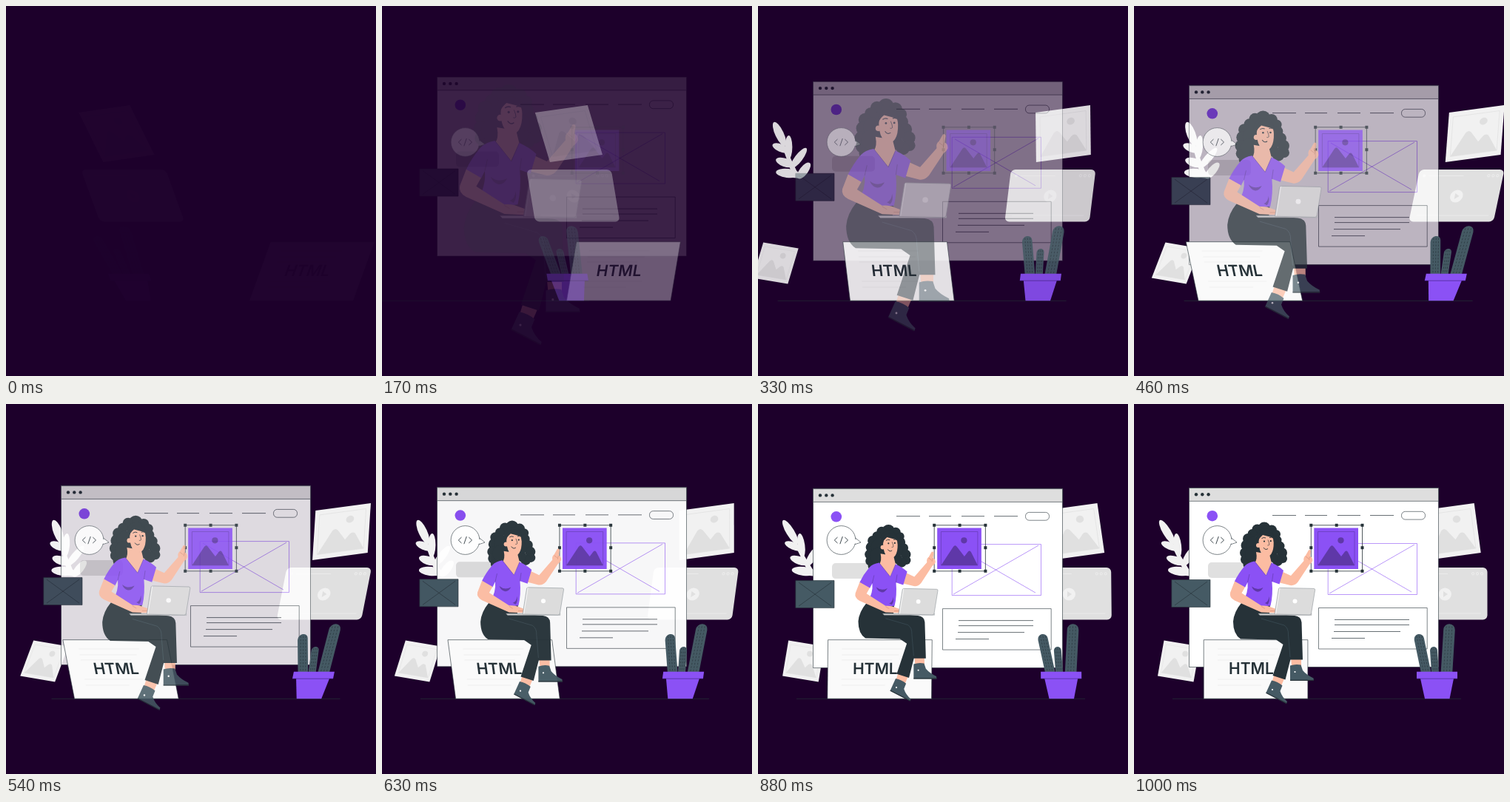
Recreate the animation shown at these times as an HTML page with a canvas. Size 500 px wide and 500 px high, loop 1040 ms.

```html
<!DOCTYPE html>
<html lang="en">
<head>
<meta charset="utf-8">
<title>Web design scene</title>
<style>
html, body { margin: 0; width: 100%; height: 100%; overflow: hidden; background: #1d002b; }
canvas { display: block; width: 500px; height: 500px; }
</style>
</head>
<body>
<canvas id="stage" width="500" height="500"></canvas>
<script>
const LOOP = 1040, FPS = 24, LEAD = 22;
const PURPLE = '#8b51f5', DARK = '#263238', SLATE = '#455a64', SKIN = '#fcbca2',
      GREY = '#e0e0e0', PALE = '#f1f1f1', WHITE = '#fff', PLUM = '#5f38a8';

const stage = document.getElementById('stage').getContext('2d');
const layer = document.createElement('canvas');
layer.width = layer.height = 500;
const c = layer.getContext('2d');

const clamp = v => Math.max(0, Math.min(1, v));

// cubic-bezier(.36, -.01, .5, 1.38)
function ease(x) {
  if (x <= 0) return 0;
  if (x >= 1) return 1;
  const at = (u, a, b) => 3 * u * (1 - u) * (1 - u) * a + 3 * u * u * (1 - u) * b + u * u * u;
  let lo = 0, hi = 1;
  for (let i = 0; i < 24; i++) {
    const mid = (lo + hi) / 2;
    if (at(mid, 0.36, 0.5) < x) lo = mid; else hi = mid;
  }
  return at(lo, -0.01, 1.38);
}

// ---- drawing helpers ----
function paint(fill, stroke, width = 0.6) {
  if (fill) { c.fillStyle = fill; c.fill(); }
  if (stroke) { c.strokeStyle = stroke; c.lineWidth = width; c.stroke(); }
}
function rect(x, y, w, h, fill, stroke, r = 0, width) {
  c.beginPath();
  c.roundRect(x, y, w, h, r);
  paint(fill, stroke, width);
}
function disc(x, y, r, fill, stroke, width) {
  c.beginPath();
  c.arc(x, y, r, 0, 7);
  paint(fill, stroke, width);
}
function line(x1, y1, x2, y2, color = DARK, width = 0.7) {
  c.beginPath();
  c.moveTo(x1, y1);
  c.lineTo(x2, y2);
  paint(null, color, width);
}
function shape(d, fill, stroke, width = 0.6) {
  const p = new Path2D(d);
  if (fill) { c.fillStyle = fill; c.fill(p); }
  if (stroke) { c.strokeStyle = stroke; c.lineWidth = width; c.stroke(p); }
}

// ---- parts, in their resting places ----
function leaf(x1, y1, x2, y2, w) {
  const mx = (x1 + x2) / 2, my = (y1 + y2) / 2;
  const len = Math.hypot(x2 - x1, y2 - y1);
  c.beginPath();
  c.ellipse(mx, my, len / 2, w / 2, Math.atan2(y2 - y1, x2 - x1), 0, 7);
  paint(PALE);
}

function plant() {
  leaf(35, 157, 54, 189, 11);
  leaf(57, 175, 61, 207, 10);
  leaf(37, 187, 60, 197, 10);
  leaf(83, 192, 66, 219, 11);
  leaf(44, 207, 69, 216, 11);
  leaf(46, 224, 78, 228, 12);
  leaf(90, 212, 77, 233, 12);
  shape('M48 180Q60 200 80 233L70 232Q58 205 46 182Z', PALE);
}

function photo(tl, tr, bl, sun) {
  c.save();
  c.transform(tr[0] - tl[0], tr[1] - tl[1], bl[0] - tl[0], bl[1] - tl[1], tl[0], tl[1]);
  rect(0, 0, 1, 1, PALE);
  rect(0.08, 0.1, 0.84, 0.8, null, GREY, 0, 0.01);
  shape('M.08 .9L.33 .46Q.38 .4 .43 .46L.57 .67L.65 .57Q.7 .52 .75 .57L.92 .9Z', GREY);
  disc(0.64, 0.27, sun, GREY);
  c.restore();
}

function photos() {
  photo([387, 144], [459.7, 134], [396, 211], 0.072);
  photo([40.5, 319.5], [89, 327.5], [32, 367.5], 0.08);
}

function video() {
  rect(363, 221, 114.5, 70.5, GREY, null, 6);
  disc(371, 229.5, 2, PALE);
  line(377, 229.5, 424, 229.5, '#ebebeb', 1);
  for (const x of [458, 464, 470]) disc(x, 229.3, 1.6, null, PALE, 0.8);
  disc(420.3, 257, 8.6, PALE);
  shape('M418 253L424 257L418 261Z', GREY);
  line(372, 283, 469, 283, '#ebebeb', 1);
}

function page() {
  rect(74.5, 113.5, 337, 242, WHITE, DARK);
  rect(74.5, 113.5, 337, 17.8, '#dedede', DARK);
  for (const x of [84, 92.3, 100.6]) disc(x, 122.3, 2.2, DARK);
  disc(105.8, 151.2, 7.3, PURPLE);
  for (const [x, w] of [[187, 32], [231, 30], [275, 31], [319, 32]]) line(x, 150.5, x + w, 150.5);
  rect(361.5, 145.3, 32, 10.8, null, DARK, 5);
  rect(100, 214, 58, 21, GREY, null, 5);

  rect(262.2, 188.5, 120.3, 69, null, PURPLE, 0, 0.6);
  line(264, 256, 379, 190, PURPLE, 0.6);
  line(266, 191, 375, 254, PURPLE, 0.6);

  rect(249.5, 275.5, 146.7, 55.5, null, DARK);
  for (const [x, y, e] of [[271, 291.5, 372], [271, 298.5, 372], [270, 307.5, 360], [267, 316.5, 312]])
    line(x, y, e, y);

  rect(50.8, 237.5, 52.2, 37, SLATE, DARK);
  line(55, 240, 99, 272, DARK, 0.6);
  line(99, 240, 55, 272, DARK, 0.6);
}

function bubble() {
  shape('M131 180.5L139 187L130 190Z', WHITE, DARK);
  disc(112.5, 184, 19.4, WHITE, DARK);
  shape('M129.5 181.5L137 187L129.5 189Z', WHITE);
  shape('M107.5 180L103.3 184L107.5 188M114.3 179L110.8 189.2M117.3 180L121.5 184L117.3 188', null, DARK, 0.9);
}

function picture() {
  rect(243.3, 167.5, 59.7, 55.6, PURPLE);
  rect(248.5, 172.5, 49.5, 45.5, null, PLUM);
  shape('M248.5 218L265 193Q267.5 189.5 270 193L280 206L285 199.5Q287 197.5 289 200L298 218Z', PLUM);
  disc(279.5, 184.3, 4.1, PLUM);
  rect(239.3, 163.8, 69.2, 62, null, DARK, 0, 0.8);
  for (const x of [239.3, 273.7, 308.5])
    for (const y of [163.8, 194.2, 225.8])
      if (x !== 273.7 || y !== 194.2) rect(x - 2, y - 2, 4, 4, DARK);
}

function card() {
  rect(94.2, 318.7, 140.7, 79.5, '#fafafa', DARK);
  for (const [y, e] of [[331, 195], [339, 190], [346, 181], [372, 192], [380, 172]])
    line(113, y, e, y, '#ececec', 0.8);
  c.fillStyle = DARK;
  c.font = '600 21px Inter, "Open Sans", sans-serif';
  c.fillText('HTML', 128, 364.5);
}

function stalk(x1, y1, x2, y2, w) {
  c.lineCap = 'round';
  line(x1, y1, x2, y2, SLATE, w);
  c.lineCap = 'butt';
  for (const s of [-0.25, 0, 0.25]) {
    c.setLineDash([2.5, 2]);
    line(x1 + s * w, y1 - w * 0.3, x2 + s * w, y2, DARK, 0.6);
    c.setLineDash([]);
  }
}

function cactus() {
  stalk(385.3, 317.6, 394.5, 362, 13.4);
  stalk(405, 333, 407, 363, 10);
  stalk(426, 305, 422.5, 362, 15.6);
  shape('M387 371H432L426.5 398.3H393Z', PURPLE);
  rect(382, 361.7, 55, 9.4, PURPLE);
  line(382, 371.2, 437, 371.2, '#4a2a90', 0.7);
}

function boots() {
  shape('M212 343L226 343L226 354L213 354Z', SKIN);
  shape('M190 364L204 369L198 383L186 377Z', SKIN);
  shape('M211 353.5Q218 351 225.5 352.5L228 360Q233 366 242.5 370.5L243 374H211Z', SLATE);
  line(211, 373.4, 243, 373.4, DARK, 1.2);
  shape('M186 373.5Q194 375 200.5 380.5L197.5 388Q200 396 207 402L206 405L178.3 390.5Z', SLATE);
  line(178.5, 390.2, 206, 404.5, DARK, 1.2);
  disc(217.5, 362, 1.1, WHITE);
  disc(187, 386, 1.1, WHITE);
}

function hair() {
  const curls = [
    [176, 168, 8.5], [166.5, 169.5, 7], [186, 170.5, 7], [192, 176, 6], [160, 175.5, 6.5],
    [154, 182, 7], [152, 191, 7.5], [150, 201, 7], [151, 210, 7], [154, 217, 6.5], [162, 213, 9],
    [193, 184, 6.5], [197, 192, 6.5], [200, 201, 7], [201, 209, 6], [194, 212, 7], [188, 207, 7],
    [163, 190, 11], [161, 203, 11], [188, 196, 8], [177, 180, 12]
  ];
  for (const [x, y, r] of curls) disc(x, y, r, DARK);
}

function face() {
  shape('M165 200L183 203L186 215L178 232L163 215Q167 210 165 200Z', SKIN);
  shape('M168.5 186Q169 176 179 174.5Q188.5 176 188.7 187Q189 197 185.5 202.5Q181.5 208 176 205.5Q168.5 200 168.5 186Z', SKIN);
  disc(168, 191, 3, SKIN);
  shape('M167 186Q170 180 174 177Q182 179 189 181Q188 172 178 171Q167 172 167 186Z', DARK);
  disc(176, 185.6, 1.1, DARK);
  disc(184.8, 185.2, 1.1, DARK);
  shape('M172.5 181.7Q175 179.6 178 181M183 180.6Q185.5 179.4 187.5 181', null, DARK, 0.9);
  shape('M181 183.5Q183 188 182.8 190.3Q181.5 191.6 180.3 190.8', null, DARK, 0.6);
  shape('M175 194Q177.5 198 181 195.5', null, DARK, 0.9);
}

function laptop() {
  shape('M168 283.2H240V285.4H170Z', '#cfcfcf', '#8d9499', 0.4);
  shape('M195.5 249.5Q196 248.3 198 248.4L243 249.4Q245 249.6 244.6 251.5L239.5 283Q239 285 237 285L190 284Z', '#dcdcdc', '#8d9499', 0.6);
  shape('M197 248.8L191.5 283.5', null, WHITE, 0.8);
  disc(217.5, 266.5, 3, WHITE);
}

function woman() {
  boots();
  hair();
  // pants
  shape('M145 269Q135 281 134 294Q134 311 144 317.5L192 318.5L201.5 325L187.5 367L204.5 372.5L212 343L210 345.5H228L226.5 295Q226 287 217 286L183 283L184 270Z', DARK);
  shape('M172 290L203 299Q209 303 208.5 312L211 342', null, '#455a64', 0.5);
  // raised arm
  shape('M199 226L212 232L229.5 212Q228.5 207 232 204.5L236 197.5Q238.5 196 239 199L237.8 206Q241.5 207 241.3 212Q240 215.5 237 217L221.5 240.5Q217 246 211 245L195 241Z', SKIN);
  shape('M232 206L236 209M237.5 206L236.5 211', null, '#c9826c', 0.5);
  face();
  // shirt
  shape('M163 212.5Q154 214 149.5 219Q141 229 135.8 240L150 248L153.5 241Q155 254 146.5 269Q164 276 184.5 272.5Q188 258 186.5 240L196.5 243.5L202 225Q196 219 186 214.5L178.5 232Z', PURPLE);
  shape('M163 212.5L178.5 232L186 214.5', null, PLUM, 0.6);
  shape('M159 246.5Q166 252.5 174.5 248Q171 254.5 166 253.5Q161 252 159 246.5Z', PLUM);
  shape('M177 269Q182 267 182.5 260Q184 267 180.5 271Z', PLUM);
  shape('M153.5 241L156 230M186.5 240L188 229', null, PLUM, 0.6);
  // resting arm
  shape('M136 239.5L150 247.5L145.5 255.5L172 272.5Q180 272 185 274.5L192 277Q194 281 190 282.3L172 281.5L136 265.5Q128.5 261.5 130 255Z', SKIN);
  shape('M172 273.5L177 276.5M184 279.5H191', null, '#c9826c', 0.5);
  laptop();
}

// ---- motion ----
function sweep(t) {
  let shift = 0, angle, alpha = 1;
  if (t < 600) {
    const p = ease(t / 600);
    shift = -250 * (1 - p);
    angle = 20 - 30 * p;
    alpha = Math.max(0.016, clamp(p));
  } else if (t < 800) {
    angle = -10 + 12 * ease((t - 600) / 200);
  } else {
    angle = 2 - 2 * ease((t - 800) / 200);
  }
  return { shift, skew: Math.tan(angle * Math.PI / 180), alpha };
}

function group(draw, alpha, a = 1, b = 0, k = 0, d = 1, e = 0, f = 0) {
  c.setTransform(1, 0, 0, 1, 0, 0);
  c.clearRect(0, 0, 500, 500);
  c.setTransform(a, b, k, d, e, f);
  draw();
  stage.globalAlpha = alpha;
  stage.drawImage(layer, 0, 0);
}

function render(t) {
  const s = sweep(t), p = ease(t / 1000), fade = clamp(p), slide = 20 * (1 - p), zoom = 1 + 0.5 * (1 - p);
  const rush = (draw, cy, dir = 1) => {
    const k = s.skew * dir;
    group(draw, s.alpha, 1, 0, k, 1, s.shift * dir - k * cy);
  };
  stage.globalAlpha = 1;
  stage.fillStyle = '#1d002b';
  stage.fillRect(0, 0, 500, 500);

  rush(() => line(52, 398.4, 442, 398.4, DARK, 0.7), 398);
  rush(plant, 254);
  rush(photos, 254);
  rush(video, 256);
  group(page, fade, 1, 0, 0, 1, 0, -slide);
  group(bubble, fade);
  group(picture, fade, 1, 0, 0, 1, slide);
  rush(card, 358, -1);
  rush(cactus, 348);
  group(woman, fade, zoom, 0, 0, zoom, 187 * (1 - zoom), 282.5 * (1 - zoom));
}

const start = performance.now();
function tick() {
  const t = (performance.now() - start) % LOOP;
  const step = Math.min(FPS, Math.floor((t + 5) * FPS / 1000));
  render(Math.min(1000, step * 1000 / FPS + LEAD));
  requestAnimationFrame(tick);
}
tick();
</script>
</body>
</html>
```
